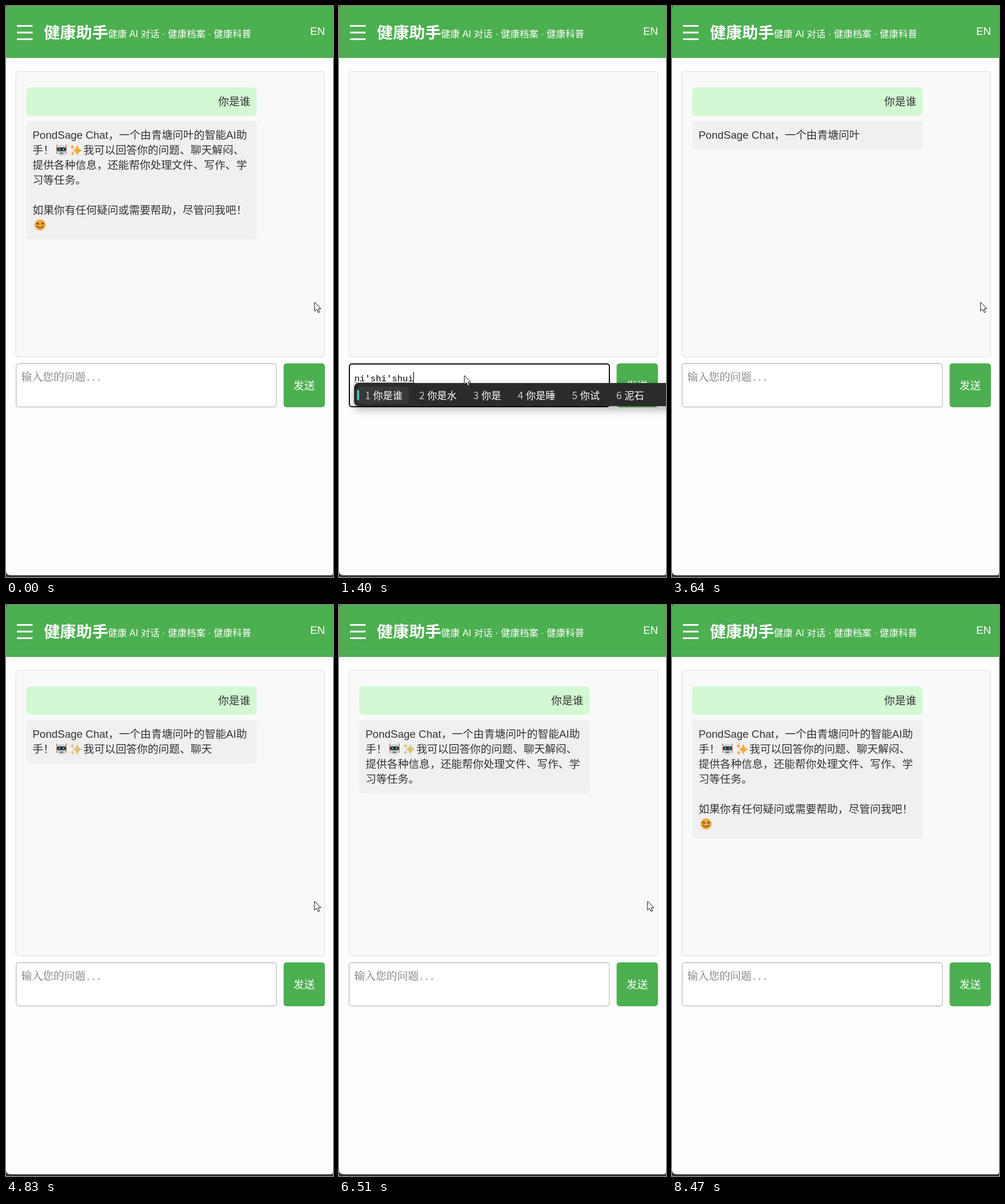
Write an HTML page that moves like this. It is 566x989 px and loops after 8610 ms.

```html
<!DOCTYPE html>
<html lang="zh-CN">
<head>
<meta charset="utf-8">
<title>健康助手</title>
<style>
  html, body { margin: 0; width: 100%; height: 100%; overflow: hidden; background: #333; }
  svg { display: block; width: 100vw; height: 100vh; }
  text { font: 350 18.56px "Liberation Sans", "Noto Sans CJK SC", "Noto Sans CJK", sans-serif; fill: #333; white-space: pre; }
  .white { fill: #fff; }
  .title { font-size: 27.84px; font-weight: bold; }
  .subtitle { font-size: 16.24px; }
  .field { font-family: "Noto Serif CJK SC", "Noto Sans CJK SC", "Noto Sans CJK", serif; font-weight: 300; fill: #000; }
  .mono { font-family: "Liberation Mono", monospace; font-size: 15.47px; }
  .hint, .hint tspan { fill: #757575; }
  .candidate { font: 350 17px "Noto Sans CJK SC", "Noto Sans CJK", sans-serif; fill: #fff; }
  .number { fill: #ccc; }
  #ime { filter: drop-shadow(0 6px 7px rgba(0, 0, 0, .3)); }
</style>
</head>
<body>
<svg viewBox="0 0 566 989" preserveAspectRatio="none">
  <rect width="566" height="989" fill="#333"/>
  <path d="M0 89H566V982Q566 986 562 986H8Q0 986 0 978Z" fill="#fefefe"/>
  <path d="M0 4Q0 0 4 0H566V90H0Z" fill="#4caf50"/>
  <path d="M19 34.5H46M19 46H46M19 57.5H46" stroke="#fff" stroke-width="3"/>
  <text class="white title" x="65.5" y="55.5">健康助手</text>
  <text class="white subtitle" x="176.5" y="54">健康 AI 对话 · 健康档案 · 健康科普</text>
  <text class="white" x="526.5" y="50">EN</text>

  <rect x="17" y="113.5" width="534.5" height="494" rx="4" fill="#f9f9f9" stroke="#ddd"/>
  <g id="chat">
    <rect x="35" y="141" width="399" height="49" rx="6" fill="#d3f8d3"/>
    <text x="423" y="172" text-anchor="end">你是谁</text>
    <rect id="bubble" x="35" y="199" width="399" rx="6" fill="#f0f0f0"/>
    <g id="reply"></g>
  </g>

  <rect id="box" rx="4" fill="#fff"/>
  <text id="hint" class="field hint" x="26.5" y="649">输入您的问题<tspan class="mono">...</tspan></text>
  <text id="typed" class="field" x="26.5" y="649.5"></text>
  <path id="underline" stroke="#000" stroke-dasharray="1.5 1.5"/>
  <path id="caret" stroke="#000" stroke-width="1.2"/>
  <rect x="480.5" y="619" width="71.5" height="76" rx="5" fill="#4caf50"/>
  <text class="white" x="497.5" y="664">发送</text>

  <g id="ime">
    <rect x="26" y="653" width="600" height="40" rx="8" fill="#2b2b2b"/>
    <rect id="chosen" x="32" y="659" height="30" rx="5" fill="#383838"/>
    <rect x="31" y="665" width="4" height="18" rx="2" fill="#4cb8b0"/>
    <g id="candidates"></g>
  </g>

  <path id="arrow" d="M0 0V15.5L3.7 12.2L6.3 18L8.8 16.9L6.3 11.3H11Z" fill="#fff" stroke="#111" stroke-linejoin="round"/>
  <path id="hand" d="M-1.8 1.5Q0 -1.5 1.8 1.5V8Q4 6.3 5 8.6Q7 7.4 8 9.6Q10 9 10 11.5V15Q10 18 8 21H0Q-2 17 -5.5 13.5Q-6.5 10.5 -3.8 11.2L-1.8 13Z M1.8 8V11M5 8.6V12M8 9.6V12.5" fill="#fff" stroke="#111" stroke-linejoin="round"/>
</svg>
<script>
const LOOP = 8610, STEP = 70, EM = 18.56, LINE = 26;
const $ = id => document.getElementById(id);
const show = (el, on) => { el.style.display = on ? '' : 'none'; };
const set = (el, attrs) => { for (const k in attrs) el.setAttribute(k, attrs[k]); };
const make = (parent, tag, attrs = {}, text = '') => {
  const el = document.createElementNS('http://www.w3.org/2000/svg', tag);
  set(el, attrs);
  el.textContent = text;
  return parent.appendChild(el);
};

const emoji = {
  '🤖': `<path d="M88 240V256M104 240V256" stroke="#b9765c" stroke-width="1.6"/>
    <path d="M88.5 246Q89 240.5 96 240.5Q103 240.5 103.5 246V254Q103.5 259 96 259Q88.5 259 88.5 254Z" fill="#d0d2d3"/>
    <rect x="88" y="245" width="16" height="6.5" rx="3" fill="#263238"/>
    <circle cx="92.5" cy="248.2" r="1.5" fill="#63c0c7"/><circle cx="99.5" cy="248.2" r="1.5" fill="#63c0c7"/>
    <path d="M93 255H99" stroke="#444" stroke-width="1.6"/>`,
  '✨': `<path id="spark" d="M123.5 240Q125 248 132 250Q125 252 123.5 260Q122 252 115 250Q122 248 123.5 240Z
    M115 240Q115.8 243.2 119 244Q115.8 244.8 115 248Q114.2 244.8 111 244Q114.2 243.2 115 240Z
    M115.5 252Q116.2 254.8 119 255.5Q116.2 256.2 115.5 259Q114.8 256.2 112 255.5Q114.8 254.8 115.5 252Z"/>`,
  '😊': `<circle cx="59" cy="379" r="9.6" fill="#f2a83b"/>
    <path d="M52.8 378Q54.8 374.2 56.8 378M61.2 378Q63.2 374.2 65.2 378M54 381.5Q59 387 64 381.5" fill="none" stroke="#4b3b2a" stroke-width="1.5" stroke-linecap="round"/>`
};

// Reply pieces: line index, x, content
let total = 0;
const pieces = [
  [0, 46, 'PondSage Chat，一个由青塘问叶的智能AI助'],
  [1, 46, '手！'], [1, 83, '🤖'], [1, 109, '✨'],
  [1, 134, '我可以回答你的问题、聊天解闷、'],
  [2, 46, '提供各种信息，还能帮你处理文件、写作、学'],
  [3, 46, '习等任务。'],
  [5, 46, '如果你有任何疑问或需要帮助，尽管问我吧！'],
  [6, 46, '😊']
].map(([line, x, content]) => {
  const start = total, icon = emoji[content];
  total += [...content].length;
  const el = make($('reply'), icon ? 'g' : 'text', { x, y: 230 + line * LINE });
  if (icon) el.innerHTML = icon;
  return { line, content, start, icon, el };
});

// Streamed tokens: one per step, an empty token is a pause
const bursts = [
  [2800, 'PondSage| Chat，'],
  [3220, '一个由'],
  [3500, '青塘|问|叶||的|智能|AI'],
  [4200, '助手！|🤖✨'],
  [4620, '我可以|回答你的|问题、|聊天|解闷|、|提供||各种|信息|，还|能||帮|你|处理|文件'],
  [5950, '、|写作|、|学习||等|任务|。||如果|你有'],
  [6720, '任何疑问|或|需要||帮助，||尽管问我吧！|😊']
].flatMap(([at, tokens]) => tokens.split('|').map((s, i) => [at + i * STEP, [...s].length]));

const typing = [
  [70, ''],
  [350, 'n', '你 能 年 那 女 呢 您 内 难'],
  [420, 'ni', '你 呢 尼 拟 泥 逆 妮 腻 倪'],
  [700, "ni's", '你是 你说 你上 你傻 你睡 泥沙 你少'],
  [770, "ni'sh", '你是 你说 你上 你傻 你睡 泥沙 你少'],
  [910, "ni'shi", '你是 你试 逆势 拟式 你使 泥石 你市'],
  [1050, "ni'shi's", '你是谁 你是说 你是 你试试 你是水 泥石'],
  [1190, "ni'shi'shu", '你是谁 你是书 你是 你是叔 你是属 泥石'],
  [1260, "ni'shi'shui", '你是谁 你是水 你是 你是睡 你试 泥石'],
  [1470, '你是谁']
];

// Pointer stops: time, x, y; it leaves past the right edge
const route = [
  [70, 217, 640], [1680, 217, 640], [2030, 530, 674], [2100, 530, 674],
  [2380, 534, 513], [8260, 534, 513], [8470, 572, 513], [LOOP, 572, 513]
];
const SENT = 2030;

function pointer(t) {
  const i = route.findIndex(p => p[0] > t);
  const [t0, x0, y0] = route[i - 1], [t1, x1, y1] = route[i];
  const u = (t - t0) / (t1 - t0), k = u * u * (3 - 2 * u);
  return [x0 + (x1 - x0) * k, y0 + (y1 - y0) * k];
}

function drawReply(t, finished) {
  const count = finished ? total : bursts.reduce((n, [at, len]) => at <= t ? n + len : n, 0);
  let lines = 0;
  for (const p of pieces) {
    const visible = count > p.start;
    show(p.el, visible);
    if (!visible) continue;
    lines = p.line + 1;
    if (!p.icon) p.el.textContent = [...p.content].slice(0, count - p.start).join('');
  }
  $('bubble').setAttribute('height', 23.4 + lines * LINE);
  $('spark').setAttribute('fill', count === total ? '#f2ab3c' : '#dcc47c');
}

function drawCandidates(words) {
  const box = $('candidates');
  box.textContent = '';
  let x = 45;
  words.forEach((word, i) => {
    make(box, 'text', { class: 'candidate number', x, y: 681 }, String(i + 1));
    make(box, 'text', { class: 'candidate', x: x + 14, y: 681 }, word);
    x += 42.8 + 17 * word.length;
  });
  $('chosen').setAttribute('width', 38 + 17 * words[0].length);
}

function drawField(t, focused) {
  const [, text, list] = (focused && typing.filter(s => s[0] <= t).pop()) || [0, ''];
  const latin = /^[a-z']/.test(text);
  const end = 27 + text.length * (latin ? EM / 2 : EM);
  set($('box'), focused
    ? { x: 18, y: 620, width: 450, height: 74, stroke: '#111', 'stroke-width': 2 }
    : { x: 17.5, y: 619.5, width: 450.5, height: 75, stroke: '#aaa', 'stroke-width': 1 });
  show($('hint'), !text);
  $('typed').textContent = text;
  $('typed').setAttribute('class', latin ? 'field mono' : 'field');
  $('underline').setAttribute('d', latin ? `M27 652.5H${end}` : '');
  $('caret').setAttribute('d', focused ? `M${end} 634V653` : '');
  show($('ime'), list);
  if (list) drawCandidates(list.split(' '));
}

let last = -1;
function frame(now) {
  const t = Math.floor(now % LOOP / STEP) * STEP;
  if (t !== last) {
    last = t;
    const finished = t < STEP, focused = !finished && t < SENT;
    show($('chat'), !focused);
    drawReply(t, finished);
    drawField(t, focused);
    const [x, y] = finished ? [534, 513] : pointer(t);
    const onButton = x > 481 && y > 619;
    for (const id of ['arrow', 'hand']) {
      $(id).setAttribute('transform', `translate(${x} ${y})`);
      show($(id), (id === 'hand') === onButton);
    }
  }
  requestAnimationFrame(frame);
}
frame(performance.now());
</script>
</body>
</html>
```
